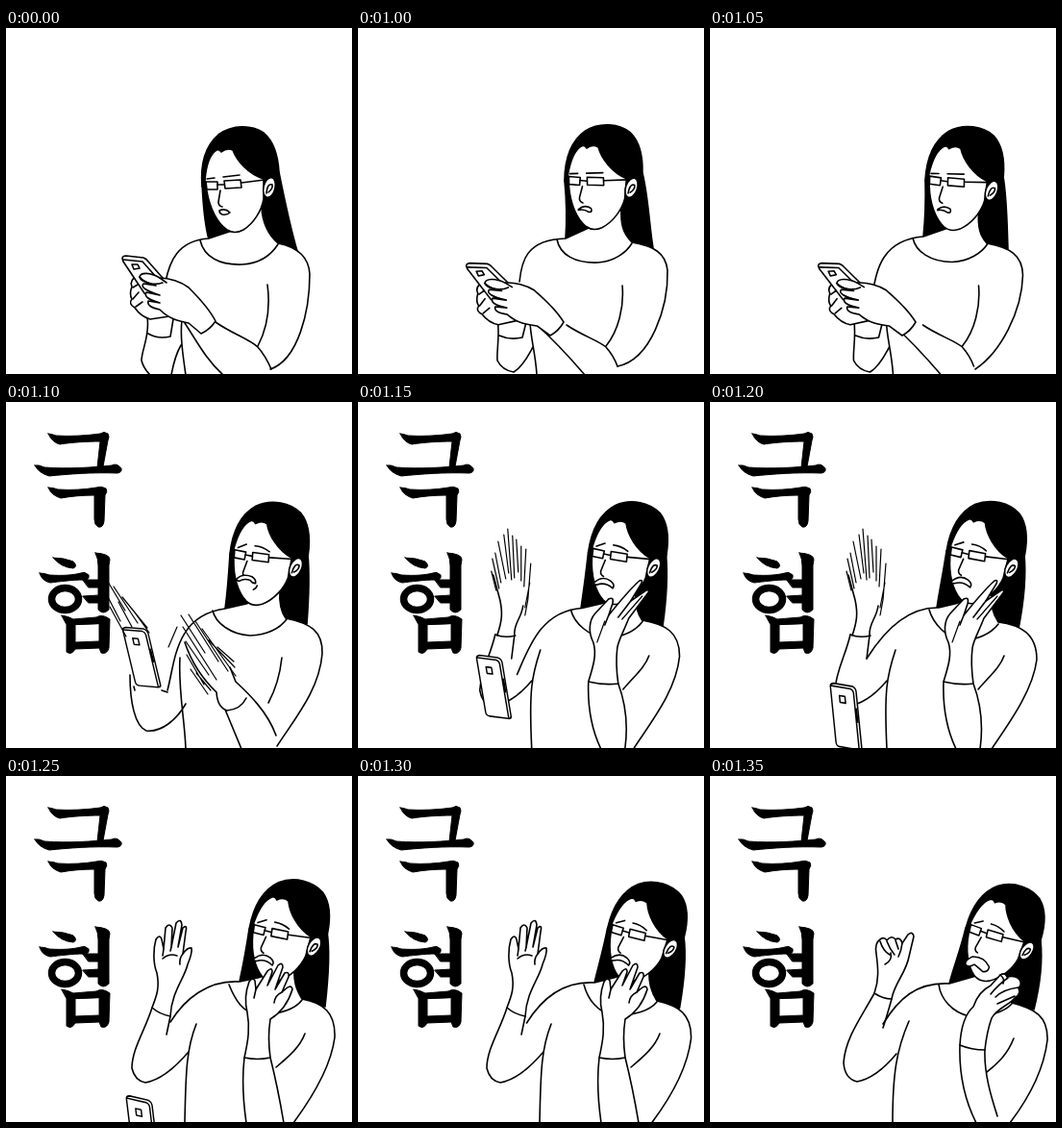
Recreate the animation shown at these times as an HTML page. Size 360x360 px, loop 2.35 s.

```html
<!DOCTYPE html>
<html lang="ko">
<head>
<meta charset="utf-8">
<title>극혐</title>
<style>
html, body { margin: 0; width: 100%; height: 100%; overflow: hidden; background: #fff; }
svg { display: block; width: 100vw; height: 100vh; }
path, ellipse { stroke: #000; stroke-width: 1.6; stroke-linecap: round; stroke-linejoin: round; fill: #fff; }
.ink path { fill: #000; stroke-width: 1; fill-rule: evenodd; }
.ink ellipse { fill: none; stroke-width: 7.5; }
.line { fill: none; }
.solid { fill: #000; }
.thin { fill: none; stroke-width: 1.2; }
</style>
</head>
<body>
<svg viewBox="0 0 360 360">
  <g id="word" class="ink" role="img" aria-label="극혐">
    <path d="M44,33 Q47,33 52,35 C66,36 84,35 98,33 Q102,30 106,33 Q108,36 106,40 L101,67 Q98,71 95,68 L98,41 C84,41 68,42 56,44 Q48,42 44,33Z"/>
    <path d="M30,66 Q34,65 40,68 C65,70 90,68 110,66 Q115,63 120,69 Q121,73 116,74 C90,73 65,75 45,77 Q34,74 30,66Z"/>
    <path d="M44,89 Q49,89 54,91 C68,92 82,91 94,89 Q99,87 104,90 Q106,93 103,97 L102,124 Q101,131 96,130 Q92,128 92,122 L92,97 C80,97 68,98 57,100 Q47,97 44,89Z"/>
    <path d="M49,162 Q60,162 70,166 Q75,171 70,173 Q57,172 49,162Z"/>
    <path d="M35,178 Q40,178 45,180 C60,181 70,180 78,178 Q82,176 86,180 Q87,185 82,185 C68,185 55,187 46,188 Q37,186 35,178Z"/>
    <ellipse cx="61.5" cy="205" rx="14" ry="11.5"/>
    <path d="M93,157 Q108,158 108,164 L107,170 L107,216 Q101,222 96,216 L96,170 Q96,163 93,157Z"/>
    <path d="M80,185 L97,185 L97,193 L86,193Z M80,202 L97,201 L97,209 L86,209Z"/>
    <path d="M58,222 Q65,223 70,226 L94,224 Q100,220 108,226 L107,256 Q105,263 99,261 L97,256 L72,257 Q68,264 63,260 L63,232Z M72,232 L72,250 L97,249 L97,231Z"/>
  </g>
  <path id="hair" class="solid"/>
  <path id="cap" class="solid" d="M204,165 C202,140 208,122 221,111 C236,100 256,101 268,109 C279,118 283,132 284,150 L284,172 L262,180 L215,180Z"/>
  <path id="body"/>
  <path id="collar" class="line"/>
  <g id="head">
    <path d="M207,158 C208,146 211,132 219,127 Q222,126 224,129 Q230,124 236,127 C240,138 252,152 268,157 L268,178 C266,190 258,203 247,210 Q238,215 230,210 C220,203 212,188 209,170Z"/>
    <ellipse cx="274" cy="166" rx="6" ry="10.5" transform="rotate(14 274 166)"/>
    <path class="line" d="M271,172 Q272,161 277,163 Q278,167 273,171 M223,169 L221,181 Q221,185 225,186"/>
    <path d="M208,160 L220,160 L220,168 L209,168Z M227,159 L244,158 L245,166 L228,167Z"/>
    <path class="line" d="M220,163 L227,163 M245,161 L269,158"/>
    <path id="brow" class="line"/>
    <path id="mouth"/>
  </g>
  <path id="arms" class="line"/>
  <g id="phone">
    <path d="M0,3 Q0,0 4,-1 L24,-1 Q28,0 28,4 L28,62 Q28,65 24,65 L4,65 Q0,65 0,61Z"/>
    <path class="line" d="M1,2 L22,2 Q25,3 25,6 L25,64 M9,11 L15,11 L15,18 L9,18Z M26.5,22 L26.5,36"/>
  </g>
  <g id="hold">
    <path d="M137,258 Q128,262 131,269 Q128,277 131,282 Q127,287 134,291 Q140,300 150,303 L170,300 L165,262Z"/>
    <path d="M121,240 Q121,237 125,237 L143,239 Q146,240 148,243 L163,260 L160,285 L144,276 L122,243Z"/>
    <path class="line" d="M122,241 L142,243 L157,260 M131,246 L137,246 L139,250 L133,251Z M132,270 L137,267 M132,282 L138,275 M135,290 L142,285"/>
    <path d="M218,305 C212,293 200,280 190,270 C182,264 170,260 160,260 C150,254 140,254 139,259 C140,264 150,266 156,268 L143,266 Q138,271 160,278 L146,275 Q142,281 160,286 L148,284 Q146,290 160,293 C170,303 180,305 190,307 L203,318 Q212,314 218,305Z"/>
    <path class="line" d="M139,259 C145,266 155,268 163,265 M160,260 L167,265"/>
  </g>
  <path id="hands"/>
  <path id="creases" class="line"/>
  <path id="blur" class="thin"/>
</svg>
<script>
const $ = id => document.getElementById(id);
const calm = 'M222,190 Q228,187 233,192 Q230,195 225,194 Q222,193 222,190Z';
const sulk = 'M221,193 Q227,187 234,191 Q236,195 232,195 Q226,192 221,194Z';
const wince = 'M216,189 Q221,182 231,184 Q236,186 236,190 Q233,191 230,188 Q223,187 219,191 Q215,191 216,189Z M238,192 Q238,195 235,197';
const frown = 'M217,194 Q224,185 233,189 Q239,192 237,196 Q228,191 220,196 Q216,197 217,194Z';
const gape = 'M217,202 Q215,198 221,192 Q233,187 242,196 Q243,202 237,203 Q230,200 226,199 Q221,205 217,202Z';
const flat = 'M209,157 L217,156 M226,155 L243,153';
const worry = 'M211,157 L219,152 M228,152 Q236,151 244,155';

// head: dx, dy, angle, scale; phone: matrix
const poses = [
  {
    head: [0, 0, 0, 1], brow: flat, mouth: calm,
    hair: 'M204,160 C205,185 207,205 211,220 L260,226 L303,232 C295,205 289,175 284,150Z',
    body: 'M166,264 C170,244 178,221 211,219 L232,212 L266,187 C267,205 274,216 283,224 C303,228 315,238 316,256 C316,295 304,345 275,355',
    collar: 'M202,221 C206,238 222,247 246,246 C264,245 276,236 283,225',
    arms: 'M183,304 C181,320 184,340 187,361 M182,330 C178,337 174,350 172,361 M147,301 C150,320 141,335 141,346 Q143,354 150,361 M148,318 Q158,324 171,321 M171,321 L174,303 M272,267 C275,290 273,310 262,331 M218,306 C235,318 254,324 262,332 Q270,341 276,355 M186,307 C198,325 208,345 226,361',
    hold: ''
  },
  {
    head: [11, -4, 5, 1], brow: flat, mouth: sulk,
    hair: 'M215,159 C217,180 217,205 216,219 L260,226 L307,229 C303,205 302,175 296,151Z',
    body: 'M168,264 C170,244 174,220 216,219 L240,208 L274,187 C273,205 276,214 285,223 C308,227 320,234 322,252 C323,290 305,345 270,352',
    collar: 'M207,220 C210,236 226,245 250,244 C266,243 279,234 285,224',
    arms: 'M179,305 C179,320 185,340 186,361 M182,332 C178,339 172,352 162,358 M145,301 C148,320 144,335 145,346 Q150,356 162,358 M147,320 Q158,325 171,322 M171,322 L175,306 M275,268 C277,290 271,315 258,331 M217,309 C233,320 250,325 258,332 Q266,341 270,352 M184,307 C202,323 218,340 236,361',
    hold: 'translate(-4 1) rotate(-4 218 305)'
  },
  {
    head: [29, -3, 11, 1], brow: worry, mouth: wince,
    hair: 'M233,158 C232,175 230,200 228,215 L270,226 L313,231 C315,205 316,180 314,158Z',
    body: 'M168,300 C176,270 176,222 228,215 L250,210 L285,196 C284,210 286,218 291,225 C316,230 330,238 329,262 C326,300 300,330 282,358',
    collar: 'M215,217 C218,230 234,242 254,243 C274,242 286,234 292,226',
    arms: 'M129,284 C129,312 134,337 146,342 C162,344 178,330 187,314 M181,266 C179,300 186,330 187,361 M287,266 C285,285 280,300 273,313 M239,291 C252,303 272,322 281,347 M228,320 L245,361 M219,302 Q220,318 230,321 Q244,320 250,308 M186,250 Q196,280 219,302 M233,276 L239,291 M133,296 L134,300 M162,300 L168,302',
    phone: [.93, .08, .22, .92, 121, 235],
    blur: 'M106,187 L124,217 M104,199 L119,228 M112,192 L137,230 M121,203 L147,235 M131,215 L149,240 M117,208 L131,234 M108,213 L125,244 M182,222 L207,261 M190,221 L221,270 M197,228 L231,280 M204,236 L239,285 M184,234 L219,289 M187,249 L211,284 M211,248 L238,276 M220,255 L237,270 M188,263 L206,294 M192,278 L210,304 M198,282 L213,300 M178,234 L169,255'
  },
  {
    head: [42, -5, 14, 1], brow: worry, mouth: frown,
    hair: 'M246,155 C243,175 239,195 236,214 L280,228 L321,236 C327,205 329,180 327,159Z',
    body: 'M163,267 C180,240 205,213 238,214 L255,210 L293,198 C292,212 294,220 300,229 C322,232 340,240 340,268 C336,300 312,333 293,361',
    collar: 'M228,216 C232,230 246,246 262,248 C280,247 293,240 300,231',
    arms: 'M146,242 C141,264 131,280 130,300 Q132,312 141,317 C160,315 174,302 184,290 M166,243 L163,267 M193,258 C184,285 181,300 184,361 M243,291 C242,318 246,340 256,361 M274,293 Q286,325 281,361 M306,264 C302,276 290,286 279,299',
    hands: 'M148,243 C153,228 154,220 151,206 L144,180 M166,243 C165,230 173,226 175,212 M243,291 C248,275 252,262 248,250 C243,240 243,228 250,220 L264,205 Q270,202 268,210 L264,222 C272,212 285,196 296,186 Q300,184 298,189 L287,207 L303,196 Q308,195 304,200 L285,225 C280,238 274,248 273,256 Q271,272 274,293 Q260,295 243,291Z M146,242 Q156,246 167,243',
    creases: 'M264,222 L260,232 M287,207 L274,224',
    phone: [.95, .16, .1, 1, 125, 293],
    blur: 'M149,145 L157,184 M155,138 L160,178 M159,132 L163,185 M164,139 L166,183 M168,143 L170,177 M173,150 L173,186 M178,153 L176,192 M143,163 L150,194 M146,157 L152,188 M183,168 L180,206 M182,188 L177,214 M180,206 L177,222 M142,176 L147,196 M260,228 L252,250 M299,202 L278,226'
  },
  {
    head: [49, -1, 15, 1], brow: worry, mouth: frown,
    hair: 'M253,159 C250,180 246,200 243,214 L290,230 L332,240 C336,205 337,180 334,162Z',
    body: 'M171,256 C186,232 210,212 243,214 L262,210 L300,198 C299,214 302,222 308,232 C330,236 343,246 342,272 C338,304 316,338 299,361',
    collar: 'M232,217 C238,232 246,246 262,249 C284,248 300,244 308,233',
    arms: 'M152,241 C145,264 131,284 131,304 Q134,317 145,319 C163,316 178,301 190,287 M171,250 L167,269 M198,258 C188,283 187,306 186,361 M248,293 C245,318 247,340 250,361 M275,293 Q283,325 289,361 M311,268 C306,282 294,292 281,303',
    hands: 'M152,241 C157,228 160,220 157,205 C153,195 153,180 156,170 Q160,164 162,170 L164,180 L166,158 Q170,152 173,158 L172,178 L177,153 Q182,147 183,155 L179,178 L184,158 Q189,154 187,162 L184,185 Q189,178 193,179 Q194,184 189,196 C186,210 172,225 171,250 Q160,248 152,241Z M248,293 C252,275 254,262 251,246 C248,234 250,222 253,214 Q256,209 259,213 L260,222 L272,203 Q277,198 277,204 L272,218 L283,197 Q288,193 288,199 L280,222 L290,205 Q295,203 294,209 L287,225 Q297,215 298,222 C294,235 288,245 275,253 Q272,272 275,293 Q262,296 248,293Z',
    creases: 'M164,180 L163,187 M172,178 L171,182 M184,185 Q180,190 181,196 M163,190 Q170,184 178,187 M260,222 L258,231 M287,225 Q280,228 279,236',
    phone: [.95, .22, .12, 1, 125, 333]
  },
  {
    head: [61, 0, 20, .97], brow: worry, mouth: gape,
    hair: 'M266,158 C261,180 253,200 249,216 L295,230 L337,243 C344,215 346,190 344,171Z',
    body: 'M180,258 C196,232 215,214 249,216 L270,210 L306,200 C305,216 308,226 314,236 C338,242 352,250 351,275 C347,308 328,340 312,361',
    collar: 'M238,217 C240,232 252,246 270,250 C290,250 306,246 314,237',
    arms: 'M171,226 C158,250 141,272 139,298 Q140,315 153,318 C170,315 184,301 194,289 M189,232 Q184,250 180,262 M207,255 C194,285 190,310 190,361 M260,280 C259,310 264,335 277,361 M286,285 C285,310 293,335 299,354 M316,273 C310,288 302,297 288,308',
    hands: 'M171,226 C176,212 175,200 173,185 Q171,174 177,170 Q181,167 184,171 Q189,165 193,170 Q198,167 200,174 L206,165 Q211,161 212,167 L207,188 C204,205 192,215 189,232 Q180,232 171,226Z M260,280 C261,262 265,248 274,240 C278,228 284,222 292,218 L302,207 Q307,204 309,209 Q318,207 322,212 Q325,216 321,221 Q324,227 317,231 C312,238 298,242 293,252 Q288,266 286,285 Q272,285 260,280Z',
    creases: 'M177,172 Q180,182 187,186 M184,172 Q187,180 192,186 M193,171 L196,180 M200,174 Q199,182 196,188 M182,196 Q190,192 188,184 M302,207 Q307,211 305,216 M292,227 Q300,217 310,210 M297,230 Q305,222 321,220 M299,237 L317,229'
  }
];

// Each step names the pose for the torso (halves are blends) and for the arms.
const steps = [[0, 0], [1, 1], [1.5, 1], [2, 2], [2.5, 3], [3, 3], [4, 4], [4.5, 4], [5, 5]];
const START = 1000, TICK = 50, LOOP = 2350;

const lerp = (a, b, k) => a + (b - a) * k;
function mix(a, b, k) {
  const end = b.match(/[\d.]+/g);
  let i = 0;
  return a.replace(/[\d.]+/g, n => lerp(+n, +end[i++], k));
}

function show(id, on) { $(id).style.display = on ? '' : 'none'; }

function draw(n) {
  const [at, limb] = steps[n];
  const a = poses[Math.floor(at)], b = poses[Math.ceil(at)], k = at % 1, p = poses[limb];
  const half = k > 0;
  for (const id of ['hair', 'body', 'collar']) $(id).setAttribute('d', mix(a[id], b[id], k));
  const [dx, dy, turn, size] = a.head.map((v, i) => lerp(v, b.head[i], k));
  const place = `translate(${225 + dx} ${163 + dy}) rotate(${turn}) scale(${size}) translate(-225 -163)`;
  $('head').setAttribute('transform', place);
  $('cap').setAttribute('transform', place);
  $('brow').setAttribute('d', p.brow);
  $('mouth').setAttribute('d', p.mouth);
  const drift = half ? dx - p.head[0] : 0;
  for (const id of ['arms', 'hands', 'creases', 'blur']) {
    $(id).setAttribute('d', p[id] || '');
    $(id).setAttribute('transform', `translate(${drift / 2} 0)`);
  }
  show('hold', p.hold !== undefined);
  $('hold').setAttribute('transform', p.hold || '');
  let fall = p.phone;
  if (half && fall) fall = b.phone && a.phone.map((v, i) => lerp(v, b.phone[i], k));
  show('phone', fall);
  if (fall) $('phone').setAttribute('transform', `matrix(${fall})`);
  show('word', n >= 3);
}

let last = -1;
function update(now) {
  const t = now % LOOP;
  const n = t < START ? 0 : Math.min(8, 1 + Math.floor((t - START) / TICK));
  if (n !== last) draw(last = n);
}

const begin = performance.now();
function loop() {
  update(performance.now() - begin);
  requestAnimationFrame(loop);
}
loop();
</script>
</body>
</html>
```
